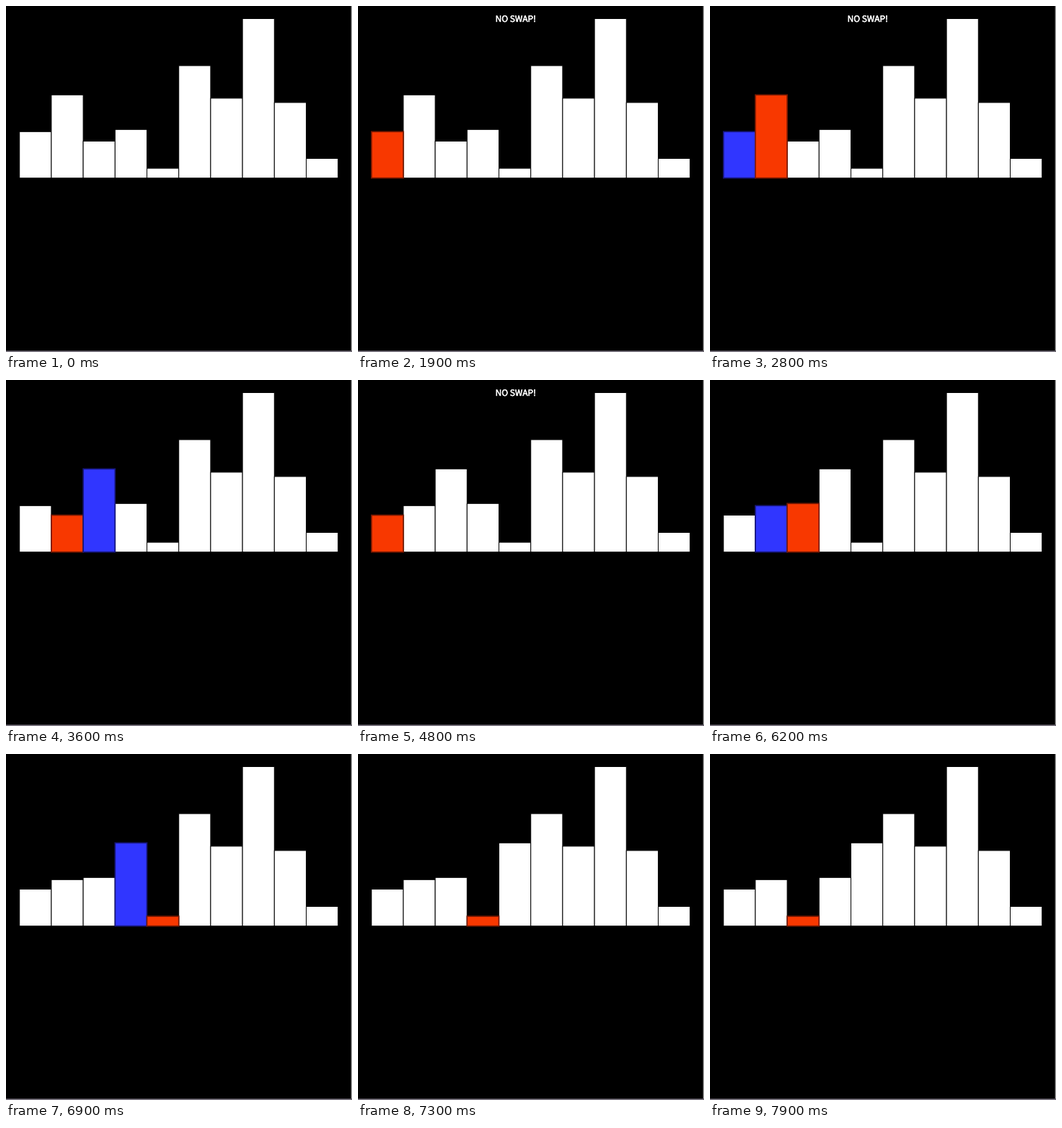
Animation, 480 px wide and 480 px high, one loop 8000 ms. Source, as a matplotlib script:

```python
import matplotlib.pyplot as plt
from matplotlib.animation import FuncAnimation
from matplotlib.patches import Rectangle
from matplotlib.patheffects import withStroke

SIZE, DPI = 480, 80
PX = 72 / DPI                  # points per pixel
TICK, TICKS = 100, 80          # ms per frame, frames per loop
LEFT, PITCH, BASE = 18.7, 44.2, 238.7
HEIGHTS = [64.4, 115.4, 51.2, 67.4, 13.6, 155.9, 110.8, 221.2, 104.8, 27.2]

# Fill, outline, outline width in px, stacking order
PLAIN = ("#ffffff", "#000000", 1.0, 2)
KEY = ("#f83800", "#781800", 1.7, 3)
OTHER = ("#3036ff", "#161678", 1.7, 3)


def insertion_sort(values):
    """Yield (ticks, values, key index, neighbour index, show note)."""
    v = list(values)
    yield 1, v[:], None, None, False
    for i in range(len(v)):
        j = i
        while True:
            swap = j > 0 and v[j] < v[j - 1]
            if j == 0:
                yield (18 if i == 0 else 4), v[:], 0, None, False
                break
            yield 2, v[:], j, None, False
            yield (2 if swap else 3), v[:], j, j - 1, False
            if not swap:
                break
            v[j - 1], v[j] = v[j], v[j - 1]
            j -= 1
            yield 2, v[:], j, j + 1, False
        yield 2, v[:], j, (j - 1 if j else None), True
        yield 2, v[:], None, None, False


def timeline():
    states = []
    for ticks, *state in insertion_sort(HEIGHTS):
        states += [state] * ticks
        if len(states) >= TICKS:
            return states[:TICKS]


def box(x, y, w, h, color):
    return ax.add_patch(Rectangle((x, y), w, h, fc=color, lw=0, snap=False))


fig = plt.figure(figsize=(SIZE / DPI, SIZE / DPI), dpi=DPI, facecolor="black")
ax = fig.add_axes([0, 0, 1, 1])
ax.set_xlim(0, SIZE)
ax.set_ylim(SIZE, 0)
ax.axis("off")

# Thin window rim on the right and at the bottom
box(478, 0, 1, SIZE, "#2c2c2c")
box(479, 0, 1, SIZE, "#a4a4a4")
box(0, 478, SIZE, 1, "#5a5460")
box(0, 479, SIZE, 1, "#7c7880")

bars = [box(LEFT + PITCH * i, BASE, PITCH, 0, "white")
        for i in range(len(HEIGHTS))]

note = ax.text(218.9, 22, "NO SWAP!", color="white", ha="center",
               va="baseline", family="Noto Sans CJK JP",
               fontsize=11.9 * PX, zorder=4)
note.set_path_effects([withStroke(linewidth=0.4 * PX, foreground="white")])

STATES = timeline()


def draw(frame):
    values, key, other, show = STATES[frame]
    for i, (h, bar) in enumerate(zip(values, bars)):
        style = KEY if i == key else OTHER if i == other else PLAIN
        face, line, width, order = style
        bar.set(y=BASE - h, height=h, facecolor=face, edgecolor=line,
                linewidth=width * PX, zorder=order)
    note.set_visible(show)
    return bars + [note]


anim = FuncAnimation(fig, draw, frames=TICKS, interval=TICK,
                     repeat=True, repeat_delay=0, blit=False)
plt.show()
```
